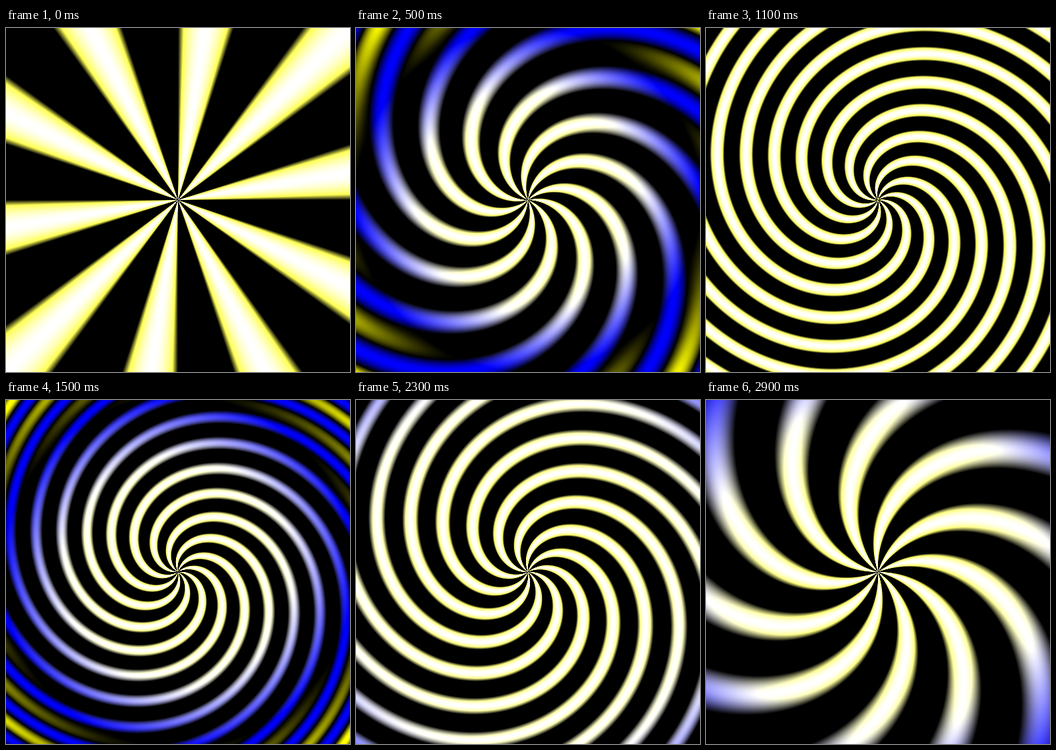
Recreate the animation shown at these times as an HTML page with a canvas. Size 510 px wide and 510 px high, loop 3 s.

```html
<!DOCTYPE html>
<html lang="en">
<head>
<meta charset="utf-8">
<title>Twisting rays</title>
<style>
  html, body { margin: 0; width: 100%; height: 100%; overflow: hidden; background: #000; }
  canvas { display: block; width: 510px; height: 510px; }
</style>
</head>
<body>
<canvas id="stage" width="510" height="510"></canvas>
<script>
  const SIZE = 510, HALF = SIZE / 2;
  const ARMS = 10, STEPS = 30, STEP_MS = 100;
  const TWIST = 40;   // phase at the stage edge when fully twisted
  const GAIN = 3;     // strength of yellow against blue

  const ctx = document.getElementById('stage').getContext('2d');
  const image = ctx.createImageData(SIZE, SIZE);
  const data = image.data;
  const radius = new Float32Array(SIZE * SIZE);
  const spokes = new Float32Array(SIZE * SIZE);

  for (let row = 0, i = 0; row < SIZE; row++) {
    for (let col = 0; col < SIZE; col++, i++) {
      const x = (col + 0.5) / HALF - 1;
      const y = (row + 0.5) / HALF - 1;
      radius[i] = Math.hypot(x, y);
      spokes[i] = ARMS * Math.atan2(y, x);
    }
  }

  function draw(t) {
    const twist = TWIST * Math.sin(t);
    const fade = Math.abs(Math.sin(3 * t));
    for (let i = 0, p = 0; i < radius.length; i++, p += 4) {
      const r = radius[i];
      const wave = 255 * Math.sin(t + twist * r - spokes[i]);
      // the pixel array clamps to 0..255
      data[p] = data[p + 1] = GAIN * wave * (1 - fade * r);
      data[p + 2] = wave;
      data[p + 3] = 255;
    }
    ctx.putImageData(image, 0, 0);
  }

  let shown = -1;
  function tick() {
    const step = Math.floor(performance.now() / STEP_MS) % STEPS;
    if (step !== shown) {
      shown = step;
      draw(step / 10);
    }
    requestAnimationFrame(tick);
  }
  tick();
</script>
</body>
</html>
```
